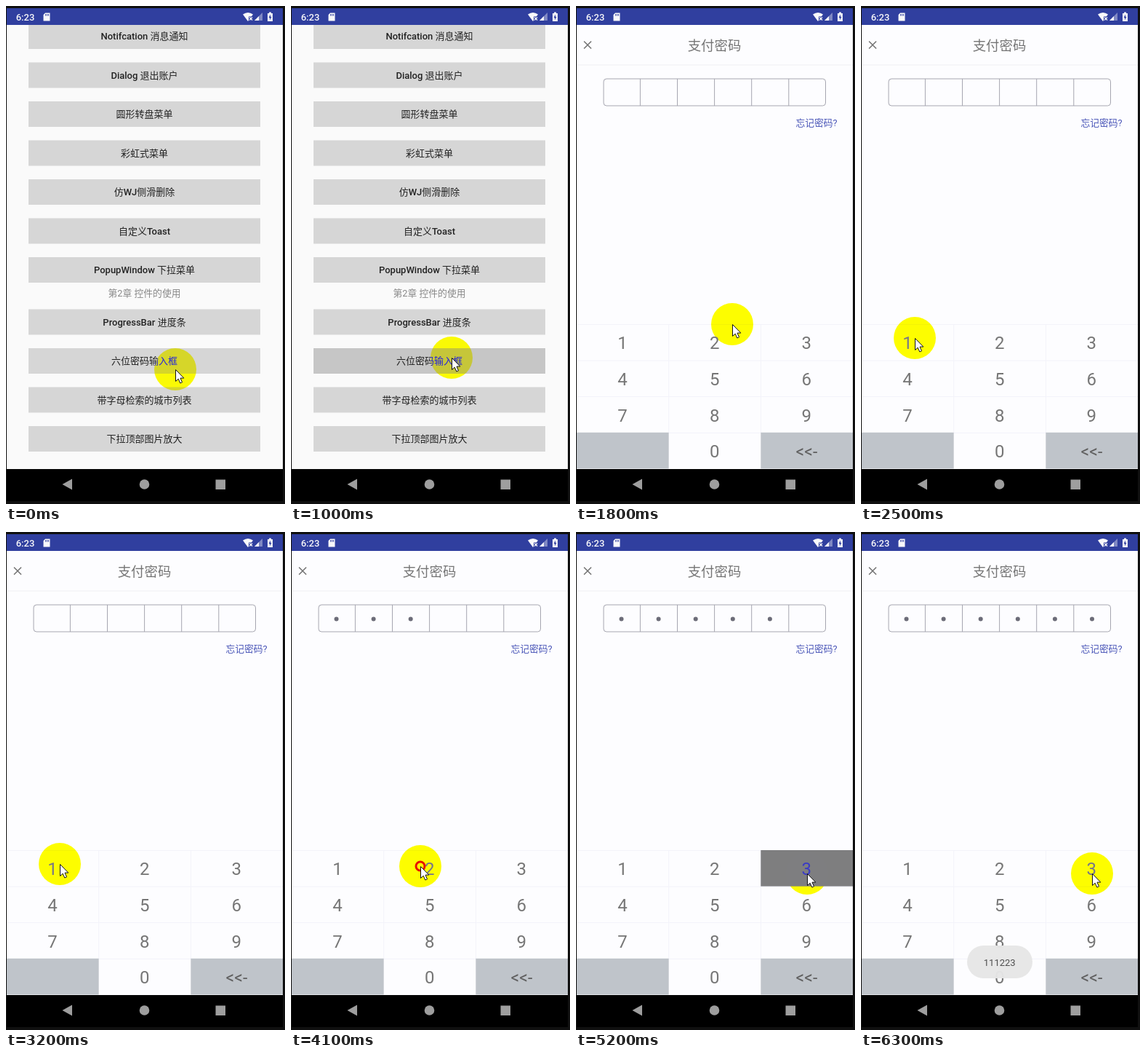
Animation, 384 px wide and 684 px high, one loop 6.8 s. Source, as an HTML page with a canvas:

```html
<!DOCTYPE html>
<html lang="zh">
<head>
<meta charset="utf-8">
<style>
html, body { margin: 0; width: 100%; height: 100%; overflow: hidden; background: #101010; }
canvas { display: block; width: 100vw; height: 100vh; }
</style>
</head>
<body>
<canvas id="stage" width="384" height="684"></canvas>
<script>
const ctx = document.getElementById('stage').getContext('2d');
const LOOP = 6800, STEP = 100, OPEN = 1400, OPEN_TIME = 400;
const LATIN = 'Roboto, sans-serif';
const HAN = '"Noto Sans CJK SC", "Noto Sans CJK", sans-serif';

const BUTTONS = [
  'Notifcation 消息通知', 'Dialog 退出账户', '圆形转盘菜单', '彩虹式菜单',
  '仿WJ侧滑删除', '自定义Toast', 'PopupWindow 下拉菜单', 'ProgressBar 进度条',
  '六位密码输入框', '带字母检索的城市列表', '下拉顶部图片放大'
];
const FIRST_SECTION = 7, TARGET = 8;
const KEYS = [...'123456789', '', '0', '<<-'];
const CODE = '111223';
// When each digit of the code is held down
const TAPS = [3400, 3600, 3800, 4200, 4400, 5200];
const LIST_TAP = 500;
// Pointer moves: start, end, x, y
const MOVES = [
  [0, 400, 221, 483], [1400, 1800, 215, 437], [1800, 2500, 74, 456],
  [3800, 4100, 178, 459], [4600, 5100, 318, 469]
];

const clamp = v => Math.max(0, Math.min(1, v));
const smooth = p => p * p * (3 - 2 * p);
const lerp = (a, b, p) => a + (b - a) * p;
const mix = (a, b, p) => `rgb(${a.map((v, i) => Math.round(lerp(v, b[i], p)))})`;

function rect(x, y, w, h, color) {
  ctx.fillStyle = color;
  ctx.fillRect(x, y, w, h);
}

function disc(x, y, r, color) {
  ctx.fillStyle = color;
  ctx.beginPath();
  ctx.arc(x, y, r, 0, Math.PI * 2);
  ctx.fill();
}

function poly(points, color) {
  ctx.fillStyle = color;
  ctx.beginPath();
  points.forEach(([x, y]) => ctx.lineTo(x, y));
  ctx.closePath();
  ctx.fill();
}

function line(x1, y1, x2, y2, color, width = 1) {
  ctx.strokeStyle = color;
  ctx.lineWidth = width;
  ctx.beginPath();
  ctx.moveTo(x1, y1);
  ctx.lineTo(x2, y2);
  ctx.stroke();
}

function clipped(x, y, w, h, paint) {
  ctx.save();
  ctx.beginPath();
  ctx.rect(x, y, w, h);
  ctx.clip();
  paint();
  ctx.restore();
}

// Centred text; Han and Latin runs use their own fonts.
function text(str, x, y, size, color, weight = 400) {
  const runs = str.match(/[\u4e00-\u9fff]+|[^\u4e00-\u9fff]+/g) || [];
  const fontOf = run => /[\u4e00-\u9fff]/.test(run) ? `400 ${size}px ${HAN}` : `${weight} ${size}px ${LATIN}`;
  const widths = runs.map(run => {
    ctx.font = fontOf(run);
    return ctx.measureText(run).width;
  });
  let left = x - widths.reduce((a, b) => a + b, 0) / 2;
  ctx.fillStyle = color;
  runs.forEach((run, i) => {
    ctx.font = fontOf(run);
    ctx.fillText(run, left, y + size * 0.36);
    left += widths[i];
  });
}

function statusBar(color) {
  rect(1, 3, 380, 23, color);
  const white = '#f8f8fa';
  text('6:23', 26.5, 15, 13, white, 500);
  poly([[54, 9.5], [60.5, 9.5], [60.5, 20.5], [51.5, 20.5], [51.5, 12]], white);
  for (let x = 54; x < 60; x += 2) rect(x, 11, 1, 2.5, color);
  ctx.fillStyle = white;
  ctx.beginPath();
  ctx.moveTo(333, 21);
  ctx.lineTo(326, 11.5);
  ctx.quadraticCurveTo(333, 6.5, 340, 11.5);
  ctx.fill();
  rect(334, 14.5, 6, 6, color);
  line(335, 15.5, 339, 19.5, white, 1.2);
  line(339, 15.5, 335, 19.5, white, 1.2);
  poly([[342, 20], [353, 20], [353, 9]], 'rgba(248,248,250,.4)');
  poly([[342, 20], [348, 20], [348, 14]], white);
  rect(360, 10, 7, 11, white);
  rect(362, 8.5, 3, 2, white);
  poly([[364, 11.5], [361.5, 16.2], [363.2, 16.2], [363, 19.5], [365.6, 14.8], [364, 14.8]], color);
}

function navIcons(color) {
  poly([[77.5, 657], [91, 649.5], [91, 664.5]], color);
  disc(190.5, 657, 6.8, color);
  rect(288.5, 650.5, 13.5, 13.5, color);
}

function ripple(t, top) {
  const age = t - LIST_TAP;
  if (age < 0) return;
  const alpha = 0.15 * clamp(1 - (age - 200) / 600);
  clipped(31, top, 319, 35, () => disc(221, 483, 70 + age * 0.7, `rgba(0,0,0,${alpha})`));
}

function listPage(t) {
  const dim = clamp((t - OPEN + 200) / 200);
  ctx.save();
  ctx.translate(0, -1.3 * dim);
  rect(1, 3, 380, 640, mix([250, 250, 250], [229, 229, 229], dim));
  BUTTONS.forEach((label, i) => {
    const y = 41.5 + 53.5 * i + (i < FIRST_SECTION ? 0 : 18);
    rect(31, y - 17.5, 319, 35, mix([214, 214, 214], [197, 197, 197], dim));
    if (i === TARGET) ripple(t, y - 17.5);
    text(label, 190.5, y, 13, '#222', 500);
  });
  text('第2章 控件的使用', 190.5, 394, 12.8, '#888');
  statusBar(mix([48, 63, 159], [46, 59, 148], dim));
  ctx.restore();
  rect(1, 636, 380, 44, '#000');
}

function keyRect(i) {
  const w = 380 / 3, h = 49.6;
  return [1 + (i % 3) * w, 437 + Math.floor(i / 3) * h, w, h];
}

function keypad(t) {
  for (let row = 0; row < 4; row++) line(1, 437.5 + row * 49.6, 381, 437.5 + row * 49.6, '#f3f3fa');
  for (let col = 1; col < 3; col++) line(1 + col * 126.7, 437, 1 + col * 126.7, 586, '#f3f3fa');
  const held = CODE[TAPS.indexOf(t)];
  KEYS.forEach((label, i) => {
    const [x, y, w, h] = keyRect(i);
    const side = i === 9 || i === 11;
    if (side) rect(x, y, w, h, '#bfc4ca');
    text(label, x + w / 2 - 0.3, y + h / 2 + 1, side ? 23 : 24, side ? '#606060' : '#767676');
    if (label && label === held) rect(x, y, w, h, 'rgba(0,0,0,.5)');
  });
}

function codeBoxes(t) {
  const pitch = 51.1, edge = '#a6a6b0';
  ctx.strokeStyle = edge;
  ctx.lineWidth = 1;
  ctx.beginPath();
  ctx.roundRect(38, 100, 305.5, 37, 4);
  ctx.stroke();
  TAPS.forEach((tap, i) => {
    if (i) line(37.3 + i * pitch, 100, 37.3 + i * pitch, 137, edge);
    if (t > tap) disc(62.5 + i * pitch, 119.5, 3, '#6c6c78');
  });
}

function passwordPage(t, offset) {
  ctx.save();
  ctx.translate(0, offset);
  rect(1, 3, 380, 633, '#fdfdff');
  statusBar('#303f9f');
  line(11, 48.5, 21, 58.5, '#757575', 1.6);
  line(21, 48.5, 11, 58.5, '#757575', 1.6);
  text('支付密码', 190.5, 54, 18.4, '#757575');
  line(1, 81, 381, 81, '#efeff3');
  codeBoxes(t);
  text('忘记密码?', 331, 160, 12.8, '#4a56b8');
  keypad(t);
  rect(1, 636, 380, 44, '#000');
  ctx.restore();
}

function toast(t) {
  ctx.save();
  ctx.globalAlpha = clamp((t - 5600) / 700) * 0.96;
  ctx.fillStyle = '#e6e6e6';
  ctx.beginPath();
  ctx.roundRect(146, 568, 90, 45, 22.5);
  ctx.fill();
  text(CODE, 190.7, 591, 13, '#484848');
  ctx.restore();
}

function pointerAt(t) {
  let x = 233, y = 499;
  for (const [start, end, toX, toY] of MOVES) {
    const p = smooth(clamp((t - start) / (end - start)));
    x = lerp(x, toX, p);
    y = lerp(y, toY, p);
  }
  return [x, y];
}

function pointer(t) {
  const [x, y] = pointerAt(t);
  // The highlight inverts blue: white turns yellow, dark text turns blue.
  ctx.globalCompositeOperation = 'difference';
  disc(x, y, 29, '#00f');
  ctx.globalCompositeOperation = 'source-over';
  if ([LIST_TAP, ...TAPS].includes(t + STEP)) {
    ctx.strokeStyle = '#e81000';
    ctx.lineWidth = 3;
    ctx.beginPath();
    ctx.arc(x, y, 6, 0, Math.PI * 2);
    ctx.stroke();
  }
  ctx.save();
  ctx.translate(x + 0.5, y + 0.5);
  poly([[0, 0], [0, 16], [3.7, 12.7], [6.3, 18.5], [9, 17.3], [6.5, 11.6], [11.3, 11.6]], '#fff');
  ctx.strokeStyle = '#111';
  ctx.lineWidth = 1;
  ctx.stroke();
  ctx.restore();
}

function draw(t) {
  const opening = t >= OPEN && t < OPEN + OPEN_TIME;
  const rest = 1 - clamp((t - OPEN) / OPEN_TIME);
  rect(0, 0, 384, 684, '#101010');
  clipped(1, 3, 380, 677, () => {
    if (t < OPEN || opening) listPage(t);
    if (t >= OPEN) {
      const top = 3 + 412 * rest ** 4;
      clipped(0, top, 384, 684 - top, () => passwordPage(t, 25 * rest ** 3));
    }
    navIcons(opening ? '#dedede' : '#9e9e9e');
    toast(t);
    pointer(t);
  });
}

function frame() {
  const t = performance.now() % LOOP;
  draw(Math.floor(t / STEP) * STEP);
  requestAnimationFrame(frame);
}
frame();
</script>
</body>
</html>
```
